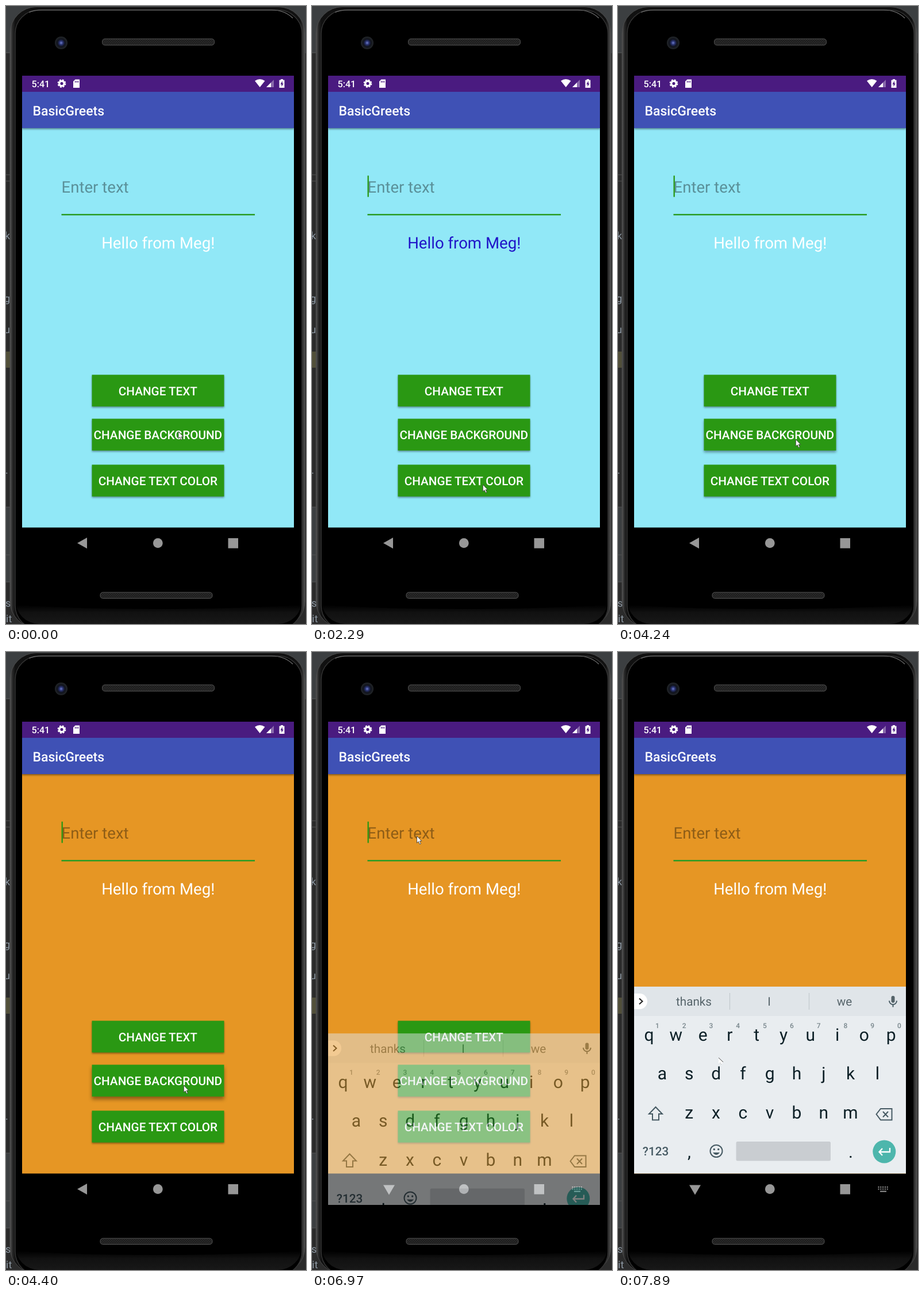
These frames come from a looping animation (522x1073 px, 8000 ms). An HTML page:

```html
<!DOCTYPE html>
<html lang="en">
<head>
<meta charset="utf-8">
<title>Phone demo</title>
<style>
html, body { margin: 0; width: 100%; height: 100%; overflow: hidden; background: #2b2b2b; }
svg { display: block; width: 522px; height: 1073px; }
text { font-family: Roboto, sans-serif; text-rendering: geometricPrecision; white-space: pre; }
.mid { text-anchor: middle; }
.big { font-size: 27.6px; }
.bold { font-weight: 500; }
.label { font-size: 20.7px; font-weight: 500; fill: #fff; text-anchor: middle; }
.code { font: 18px "DejaVu Sans Mono", monospace; fill: #8d98a3; }
.key { font-size: 30px; fill: #0d2027; text-anchor: middle; }
.digit { font-size: 12px; font-weight: 500; fill: #78868c; text-anchor: middle; }
.word { font-size: 20.7px; fill: #57656b; text-anchor: middle; }
.line { fill: none; stroke: #465a63; stroke-width: 2; }
</style>
</head>
<body>
<svg viewBox="0 0 522 1073">
  <defs>
    <linearGradient id="metal">
      <stop offset="0" stop-color="#595959"/><stop offset=".008" stop-color="#292929"/>
      <stop offset=".018" stop-color="#111"/><stop offset=".983" stop-color="#111"/>
      <stop offset=".993" stop-color="#303030"/><stop offset="1" stop-color="#5a5a5a"/>
    </linearGradient>
    <linearGradient id="chin" x2="0" y2="1">
      <stop offset="0" stop-color="#000"/><stop offset=".4" stop-color="#111"/><stop offset="1" stop-color="#181818"/>
    </linearGradient>
    <radialGradient id="lens">
      <stop offset="0" stop-color="#7180cf"/><stop offset=".3" stop-color="#27306c"/>
      <stop offset=".6" stop-color="#10131c"/><stop offset="1" stop-color="#24272a"/>
    </radialGradient>
    <pattern id="mesh" width="4" height="4" patternUnits="userSpaceOnUse">
      <rect width="4" height="4" fill="#292929"/><path d="M0 0L4 4M4 0L0 4" stroke="#1b1b1b" stroke-width=".8"/>
    </pattern>
    <clipPath id="screen"><path d="M28 121H501V960H28Z"/></clipPath>
    <clipPath id="page"><path d="M28 212H501V905.500H28Z"/></clipPath>
    <clipPath id="body"><rect x="16" y="7" width="499" height="1066" rx="42"/></clipPath>
  </defs>

  <!-- editor behind the phone -->
  <path d="M0 0H522V1073H0Z" fill="#2b2b2b"/>
  <path d="M0 0H522V82H0ZM0 870H9V1000H0Z" fill="#3c3f41"/>
  <path d="M0 81H9M0 293H9M0 304H9M0 870H9M0 953H9M0 1000H9" stroke="#555"/>
  <path d="M0 600H9V628H0Z" fill="#52503a"/>
  <g class="code">
    <text x="-2" y="405">k</text><text x="-3" y="514">g</text><text x="-3" y="568">u</text>
    <text x="-1" y="812">.</text><text x="-1" y="1043">s</text><text x="0" y="1070">it</text>
  </g>

  <!-- phone -->
  <rect x="7" y="1.500" width="513" height="1078" rx="46" fill="url(#metal)" stroke="#4b4b4b"/>
  <rect x="16" y="7" width="499" height="1075" rx="41" fill="#000" stroke="#333" stroke-width="1.500"/>
  <path d="M40 11Q50 7 62 7H462Q485 7 499 21" fill="none" stroke="#777" stroke-width="1.200"/>
  <path d="M17 1040Q130 1047 264 1047T514 1040V1073H17Z" fill="url(#chin)" clip-path="url(#body)"/>
  <circle cx="96" cy="64" r="11" fill="url(#lens)"/>
  <rect x="167.500" y="57" width="195" height="11" rx="4.500" fill="url(#mesh)" stroke="#555"/>
  <rect x="164" y="1018" width="195" height="10.500" rx="4.500" fill="url(#mesh)" stroke="#555"/>

  <!-- app page -->
  <g clip-path="url(#page)">
    <rect id="bg" x="28" y="212" width="473" height="694"/>
    <text class="big" x="96.500" y="324" fill-opacity=".38">Enter text</text>
    <path d="M96.500 362.200H433" stroke="#2a9c24" stroke-width="2.500"/>
    <path id="caret" d="M97.700 294.500V331.500" stroke="#2a9813" stroke-width="2.300"/>
    <text id="hello" class="big mid" x="264.700" y="421">Hello from Meg!</text>
    <g id="buttons"></g>
  </g>

  <!-- bars -->
  <path d="M28 149H501V212H28Z" fill="#3f51b5" style="filter:drop-shadow(0 2px 1.500px #0006)"/>
  <path d="M28 121H501V149H28Z" fill="#4a1b80"/>
  <text class="bold" x="46.500" y="189.500" font-size="23" fill="#fff">BasicGreets</text>
  <text class="bold" x="44.500" y="140.800" font-size="16.100" fill="#fff">5:41</text>
  <g fill="none" stroke="#fff">
    <circle cx="97" cy="134.500" r="4.200" stroke-width="3.300"/>
    <circle cx="97" cy="134.500" r="6.300" stroke-width="2.200" stroke-dasharray="2.900 2.050"/>
  </g>
  <path d="M120.500 127.500H128V142H117V131Z" fill="#fff"/>
  <path d="M120.500 130V133M123 130V133M125.500 130V133" stroke="#4a1b80" stroke-width="1.200"/>
  <path d="M433 130Q441.500 124 450.500 130L441.700 141Z" fill="#fff"/>
  <path d="M453 141H466V128Z" fill="#fff" fill-opacity=".35"/>
  <path d="M453 141H461V133Z" fill="#fff"/>
  <path d="M478 127H482V128.500H484.500V142H475.500V128.500H478Z" fill="#fff"/>
  <path d="M481 130L477.500 136H479.500V140L482.800 134.500H481Z" fill="#4a1b80"/>

  <!-- navigation -->
  <g fill="#979797">
    <path id="back"/>
    <circle cx="264.300" cy="932.500" r="8.400"/>
    <path d="M386.500 924H404V941.500H386.500Z"/>
    <g id="switch" fill="none" stroke="#979797">
      <path d="M452.500 929H470M452.500 932.500H470" stroke-width="2" stroke-dasharray="2 1.800"/>
      <path d="M456 936.500H467" stroke-width="2"/>
    </g>
  </g>

  <!-- keyboard -->
  <g clip-path="url(#screen)"><g id="board">
    <path d="M28 581H501V905.500H28Z" fill="#e9edf0"/>
    <path d="M28 581H501V632H28Z" fill="#e0e5e9"/>
    <path d="M194.500 592V621M332.500 592V621" stroke="#c2c9cd" stroke-width="1.200"/>
    <path d="M28 593H38A13 13.500 0 0 1 38 620H28Z" fill="#fff"/>
    <path d="M37 601.500L42.500 606.500L37 611.500" class="line" style="stroke:#222"/>
    <text class="word" x="132" y="614">thanks</text>
    <text class="word" x="263" y="614">I</text>
    <text class="word" x="394" y="614">we</text>
    <rect x="475.500" y="597" width="6" height="12" rx="3" fill="#546369"/>
    <path d="M472 605.500A6.500 6.500 0 0 0 485 605.500M478.500 612V616.500" class="line"/>
    <g id="keys"></g>
    <path d="M65.500 790L77 802H71V812.500H60V802H54Z" class="line"/>
    <path d="M449.500 802.500L457 793H476.500V812.500H457ZM461 798L470 807.500M470 798L461 807.500" class="line"/>
    <text class="bold mid" x="65.500" y="874" font-size="20.700" fill="#465a63">?123</text>
    <text class="key" x="124" y="878">,</text>
    <text class="key" x="405" y="878">.</text>
    <circle cx="171" cy="866.500" r="10.500" class="line"/>
    <path d="M165 869Q171 877 177 869Z" fill="#465a63"/>
    <circle cx="167.300" cy="863.500" r="1.700" fill="#465a63"/>
    <circle cx="174.700" cy="863.500" r="1.700" fill="#465a63"/>
    <rect x="205.500" y="850" width="164.500" height="33.500" rx="2.500" fill="#c9cdd1"/>
    <circle cx="463.300" cy="867.500" r="20" fill="#4db6ac"/>
    <path d="M473 861V868H454.500M460 862L454.500 868L460 874" class="line" style="stroke:#fff;stroke-width:2.300"/>
  </g></g>

  <g id="pointer">
    <path id="arrow" d="M0 0V12L2.800 9.500L4.900 14.200L6.900 13.300L4.900 8.800H8.400Z" fill="#fff" stroke="#333" stroke-width=".8"/>
    <g id="faded">
      <path d="M0 0V10L3 8L5 12L8 7Z" fill="#fff"/>
      <path d="M0 0L8 7.500" stroke="#444"/>
      <path d="M2.500 8.500L5.500 12.500" stroke="#aaa" stroke-dasharray="1.500 1"/>
    </g>
  </g>
</svg>
<script>
const LOOP = 8000;
const $ = id => document.getElementById(id);
const NS = "http://www.w3.org/2000/svg";

function add(parent, tag, attrs, text = "") {
  const el = document.createElementNS(NS, tag);
  for (const name in attrs) el.setAttribute(name, attrs[name]);
  el.textContent = text;
  parent.append(el);
  return el;
}

const buttons = [
  ["CHANGE TEXT", 640.3, 55],
  ["CHANGE BACKGROUND", 716.6, 55.2],
  ["CHANGE TEXT COLOR", 796.4, 55.2]
].map(([label, y, height]) => {
  const rect = add($("buttons"), "rect", { x: 149.5, y, width: 230, height, fill: "#2a9813" });
  add($("buttons"), "text", { class: "label", x: 264.3, y: y + 35.3 }, label);
  return rect;
});

[["qwertyuiop", 54, 675], ["asdfghjkl", 77, 742], ["zxcvbnm", 123.7, 810]].forEach(([row, x0, y], r) => {
  [...row].forEach((letter, i) => {
    const x = x0 + 46.8 * i;
    add($("keys"), "text", { class: "key", x, y }, letter);
    if (r === 0) add($("keys"), "text", { class: "digit", x: x + 14.3, y: 652.5 }, (i + 1) % 10);
  });
});

// Each row: start time, then the values held until the next row
const pointer = [
  [0, 300, 739], [550, 300, 752], [690, 299, 775], [820, 298, 802], [950, 298, 823], [1090, 298, 830],
  [2040, 297.3, 831], [3580, 299, 820], [3740, 304, 790], [3900, 308, 762], [4070, 309.3, 752.5],
  [4660, 308, 740], [4800, 302, 700], [4940, 292, 645], [5080, 283, 590], [5220, 278, 555], [5360, 277.5, 542.5],
  [6150, 270, 525], [6290, 245, 460], [6420, 212, 385], [6560, 190, 335], [6700, 182.5, 319.5],
  [7770, 180, 520], [7890, 175, 704.5]
];
const blinks = [150, 690, 1090, 1640, 2040, 2600, 2990, 3420, 3900, 4520, 5080, 5610, 6010, 6560, 6840, 7490];
const textColor = [[0, "#fff"], [1640, "#2015c8"], [2860, "#fff"]];
const pageColor = [[0, "#91e8f7"], [4400, "#e69624"]];
const press = [
  [0, 0, 0], [1520, 2, .4], [1640, 2, 1], [1760, 2, 0], [2730, 2, .4], [2860, 2, 1], [2990, 2, 0],
  [4240, 1, .4], [4400, 1, 1], [4520, 1, 0]
];
const board = [[0, 0, 0], [6840, 120, .2], [6970, 81.5, .5], [7090, 22, .87], [7220, 0, 1]];

const at = (track, t) => track.findLast(row => row[0] <= t).slice(1);
const show = (el, on) => el.setAttribute("visibility", on ? "visible" : "hidden");

function draw(t) {
  const [x, y] = at(pointer, t);
  $("pointer").setAttribute("transform", `translate(${x} ${y})`);
  show($("arrow"), t < 7890);
  show($("faded"), t >= 7890);

  show($("caret"), blinks.filter(b => b <= t).length % 2);
  $("hello").setAttribute("fill", at(textColor, t)[0]);
  $("bg").setAttribute("fill", at(pageColor, t)[0]);

  const [active, level] = at(press, t);
  buttons.forEach((rect, i) => {
    const lift = i === active ? level : 0;
    rect.style.filter = `drop-shadow(0 ${2 + 3 * lift}px ${1.5 + 1.5 * lift}px rgba(0,0,0,.38))`;
  });

  const [drop, alpha] = at(board, t);
  $("board").setAttribute("transform", `translate(0 ${drop})`);
  $("board").setAttribute("opacity", alpha);
  show($("switch"), alpha > 0);
  $("back").setAttribute("d", alpha > 0 ? "M124 925.500H144L134 942.500Z" : "M124 932.500L141 923V942Z");
}

let start;
function tick(now) {
  start ??= now;
  draw((now - start) % LOOP);
  requestAnimationFrame(tick);
}
draw(0);
requestAnimationFrame(tick);
</script>
</body>
</html>
```
